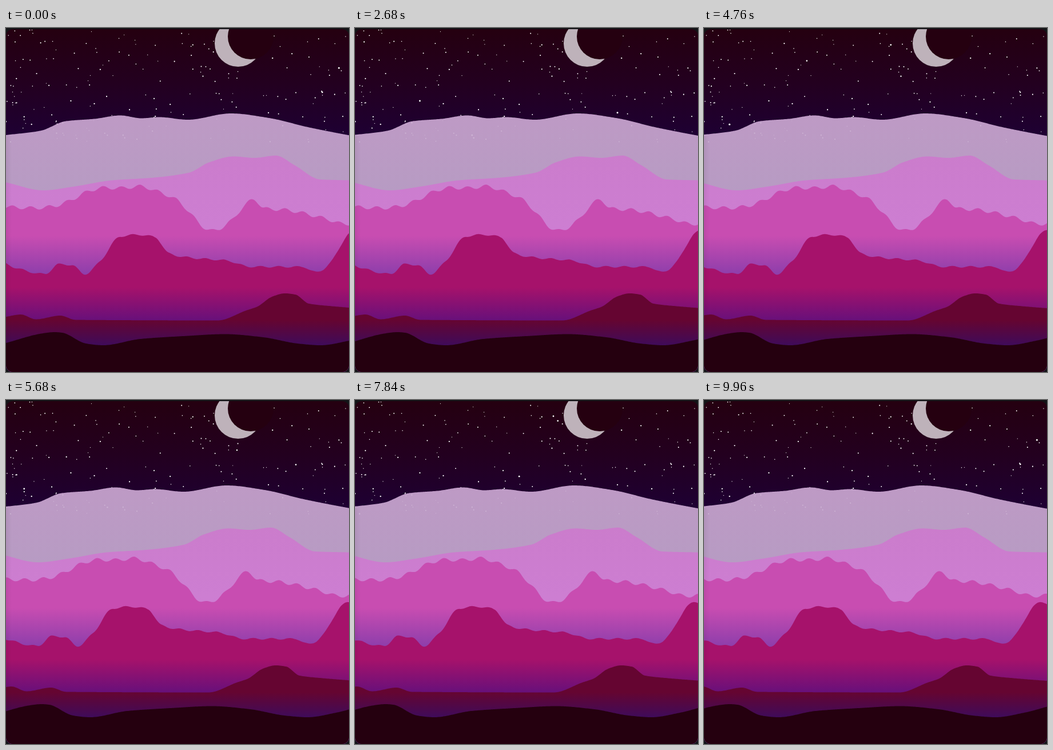
Animation of 600 by 604 pixels, one loop 10 s. Source, as an HTML page with a canvas:

```html
<!DOCTYPE html>
<html lang="en">
<head>
<meta charset="utf-8">
<title>Night mountains</title>
<style>
  html, body { margin: 0; width: 100%; height: 100%; overflow: hidden; background: #131417; }
  canvas { display: block; }
</style>
</head>
<body>
<canvas id="scene" width="600" height="604"></canvas>
<script>
const W = 600, H = 604, LOOP = 10000, STEP = 40, TAU = 2 * Math.PI;
const ctx = document.getElementById('scene').getContext('2d');

// Back to front: colour stops down the layer, key points of its ridge and an optional ripple.
const layers = [
  { stops: [[150, '#be9ac5'], [285, '#b79bc3']],
    ridge: [[0, 188], [60, 180.5], [105, 163.5], [155, 159.5], [200, 153.5], [237, 158.5], [268, 156.5],
      [318, 161], [393, 150], [460, 158], [530, 174.5], [640, 196]] },
  { stops: [[224, '#cb7ccc'], [350, '#cd7ed2']],
    ridge: [[0, 271], [65, 285], [118, 278.5], [185, 267.5], [255, 263], [320, 254], [355, 236],
      [398, 225.5], [435, 228], [472, 224], [505, 241], [550, 266], [640, 268]] },
  { stops: [[275, '#c84db1'], [365, '#c84db1'], [432, '#8e3eab']],
    ridge: [[0, 314], [50, 316], [80, 313.5], [110, 304], [140, 288.5], [170, 280.5], [202, 281],
      [234, 278], [265, 287], [297, 301], [361, 356], [392, 340], [418, 311], [434, 301],
      [452, 317], [485, 319], [560, 335], [592, 344], [640, 341]],
    ripple: { size: 3, period: 31.8, crest: 43 } },
  { stops: [[355, '#a6126b'], [455, '#a6126b'], [513, '#68107a']],
    ridge: [[0, 414], [20, 422], [68, 432], [92, 415], [115, 416], [137, 432], [165, 409], [200, 366],
      [232, 363], [262, 368], [285, 396], [320, 403], [390, 409], [425, 419], [520, 419.5],
      [543, 429], [568, 411], [600, 361], [614, 355], [640, 367]],
    ripple: { size: 1.5, period: 32, crest: 509 } },
  { stops: [[466, '#650531'], [513, '#650531'], [557, '#3f0b5a']],
    ridge: [[0, 507], [26, 503], [52, 511.5], [95, 505], [122, 512.5], [370, 513.5], [420, 496],
      [440, 489], [465, 472], [488, 466], [506, 468], [530, 484], [565, 488], [640, 494]] },
  { stops: [[534, '#25000f'], [H, '#25000f']],
    ridge: [[0, 553], [65, 536], [85, 534], [98, 535], [140, 554], [170, 557], [235, 546], [310, 541],
      [383, 537.5], [450, 543], [510, 554], [550, 557], [600, 549], [645, 537]] }
];

// Nearer layers cross faster: 250 s for the front one, 100 s more for each behind it.
const drift = (i, t) => -1000 * t / 1000 / (250 + 100 * (layers.length - 1 - i));

let seed = 29;
const random = () => (seed = seed * 16807 % 2147483647) / 2147483647;

const stars = Array.from({ length: 195 }, () => ({
  x: W * random() ** 1.15,
  y: 3 + 198 * random(),
  r: 0.55 + 0.6 * random(),
  flash: LOOP * random()
}));

function gradient(stops) {
  const top = stops[0][0], span = stops[stops.length - 1][0] - top;
  const g = ctx.createLinearGradient(0, top, 0, top + span);
  stops.forEach(([y, color]) => g.addColorStop((y - top) / span, color));
  return g;
}

// Smooth interpolation that never overshoots its key points.
function curve(points) {
  const rise = points.slice(1).map(([x, y], i) => (y - points[i][1]) / (x - points[i][0]));
  const slope = points.map((_, i) => {
    const a = rise[i - 1] ?? rise[i], b = rise[i] ?? a;
    return a * b > 0 ? 2 * a * b / (a + b) : 0;
  });
  return x => {
    const k = Math.max(0, points.findIndex(p => p[0] >= x) - 1);
    const [x0, y0] = points[k], [x1, y1] = points[k + 1];
    const w = x1 - x0, u = (x - x0) / w, v = 1 - u;
    return v * v * ((1 + 2 * u) * y0 + u * w * slope[k])
         + u * u * ((1 + 2 * v) * y1 - v * w * slope[k + 1]);
  };
}

function ridgePath({ ridge, ripple }) {
  const y = curve(ridge), path = new Path2D();
  path.moveTo(0, H);
  for (let x = 0; x <= W + 40; x += 2) {
    const wave = ripple ? ripple.size * Math.cos(TAU * (x - ripple.crest) / ripple.period) : 0;
    path.lineTo(x, y(x) - wave);
  }
  path.lineTo(W + 40, H);
  path.closePath();
  return path;
}

layers.forEach(l => {
  l.fill = gradient(l.stops);
  l.path = ridgePath(l);
});
const sky = gradient([[2, '#250010'], [100, '#230020'], [190, '#1e0033']]);
const card = new Path2D();
card.roundRect(0, 2, W, H - 2, 12);

const edge = ctx.createLinearGradient(0, 0, 10, 0);
edge.addColorStop(0, 'rgba(0, 0, 0, 0.06)');
edge.addColorStop(1, 'rgba(0, 0, 0, 0)');

function disc(x, y, r, color) {
  ctx.fillStyle = color;
  ctx.beginPath();
  ctx.arc(x, y, r, 0, TAU);
  ctx.fill();
}

function drawMoon() {
  disc(406, 27, 41, '#beb2ba');
  disc(428, 15, 40, '#250010');
}

function drawStars(t, alpha, minY) {
  ctx.globalAlpha = alpha;
  for (const s of stars) {
    if (s.y < minY) continue;
    const gap = Math.abs(t - s.flash);
    const pulse = Math.max(0, 1 - Math.min(gap, LOOP - gap) / 500);
    disc(s.x, s.y, s.r * (1 + 0.4 * pulse), '#fff');
  }
  ctx.globalAlpha = 1;
}

function draw(t) {
  ctx.fillStyle = '#131417';
  ctx.fillRect(0, 0, W, H);
  ctx.save();
  ctx.clip(card);
  ctx.fillStyle = sky;
  ctx.fillRect(0, 0, W, H);
  drawStars(t, 1, 0);
  drawMoon();
  layers.forEach((l, i) => {
    ctx.save();
    ctx.translate(drift(i, t), 0);
    ctx.fillStyle = l.fill;
    ctx.fill(l.path);
    ctx.restore();
    // The lowest stars shine faintly through the farthest ridge.
    if (i === 0) drawStars(t, 0.25, 150);
  });
  ctx.fillStyle = edge;
  ctx.fillRect(0, 190, 10, H - 190);
  ctx.restore();
}

function tick() {
  const t = performance.now() % LOOP;
  draw(Math.floor(t / STEP) * STEP);
  requestAnimationFrame(tick);
}
tick();
</script>
</body>
</html>
```
